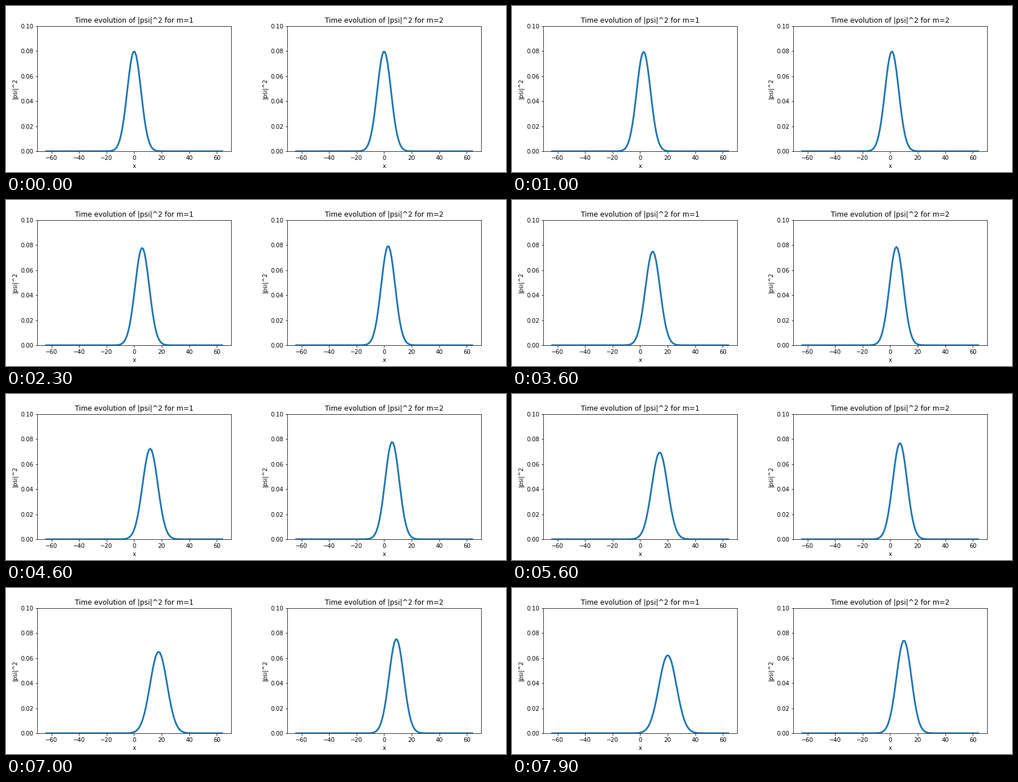
Write a matplotlib script that moves like this. It is 864 px wide and 288 px high and loops after 8 s.

```python
import numpy as np
import matplotlib.pyplot as plt
from matplotlib.animation import FuncAnimation

plt.rcParams["font.family"] = "DejaVu Sans"

FRAMES, INTERVAL = 80, 100
N, HALF = 128, 64
SIGMA, K0, DT = 5.0, 0.5, 0.5

x = np.linspace(-HALF, HALF, N)
scale = (x[1] - x[0]) ** 2  # grid steps are slightly wider than one unit


def density(t, mass):
    """|psi|^2 of a free Gaussian packet: drifts and spreads."""
    tau = scale * t / mass
    width = SIGMA * np.sqrt(1 + (tau / (2 * SIGMA**2)) ** 2)
    z = (x - K0 * tau) / width
    return np.exp(-z**2 / 2) / (width * np.sqrt(2 * np.pi))


def make_panel(left, mass):
    ax = fig.add_axes([left, 0.125, 0.3875, 0.755])
    (line,) = ax.plot(x, density(0, mass), color="#1f77b4", lw=3)
    ax.set_xlim(-1.1 * HALF, 1.1 * HALF)
    ax.set_ylim(0, 0.1)
    ax.set_title(f"Time evolution of |psi|^2 for m={mass}")
    ax.set_xlabel("x")
    ax.set_ylabel("|psi|^2")
    return mass, line


fig = plt.figure(figsize=(12, 4), dpi=72, facecolor="white")
panels = [make_panel(0.0625, 1), make_panel(0.5625, 2)]


def update(i):
    for mass, line in panels:
        line.set_ydata(density(i * DT, mass))
    return [line for _, line in panels]


anim = FuncAnimation(fig, update, frames=FRAMES, interval=INTERVAL,
                     repeat=True, repeat_delay=0)
plt.show()
```
